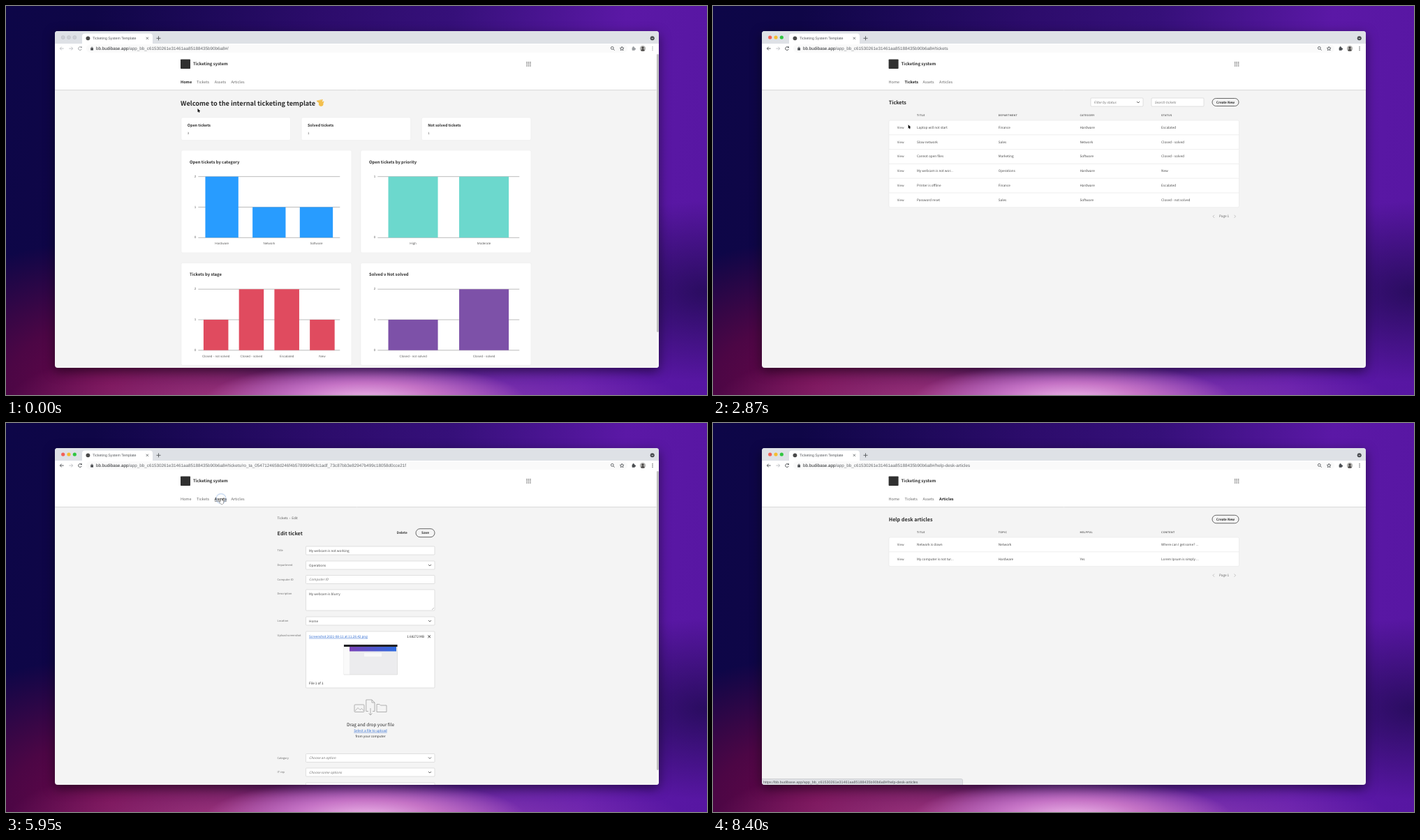
An HTML page with a canvas that plays this animation: 1004x558 px, repeating every 8470 ms.

```html
<!DOCTYPE html>
<html lang="en">
<head>
<meta charset="utf-8">
<title>Ticketing system</title>
<style>
html, body { margin: 0; width: 100%; height: 100%; overflow: hidden; }
body {
  background:
    radial-gradient(230px 55px at 515px 566px, #f0bcec, #c674c6 45%, transparent),
    radial-gradient(330px 75px at 640px 570px, #8f3cba, transparent),
    radial-gradient(330px 90px at 330px 572px, #a63a86, transparent),
    radial-gradient(330px 210px at 150px 545px, #68074a, #4c0645 45%, transparent),
    radial-gradient(240px 130px at 1004px 410px, #2a0c60, transparent),
    linear-gradient(97deg, #0d0648 0, #0f0647 12%, #2c0c6b 42%, #36107a 60%, #5b18a6 83%, #5716a2);
}
canvas { display: block; }
</style>
</head>
<body>
<canvas id="stage" width="1004" height="558"></canvas>
<script>
const ctx = document.getElementById('stage').getContext('2d');
const LOOP = 8470;
const PAGE_FONT = '"Noto Sans CJK JP", "Noto Sans CJK SC", "Noto Sans CJK", "Noto Sans", sans-serif';
const UI_FONT = '"Liberation Sans", Arial, sans-serif';
const HOST = 'bb.budibase.app';
const APP = '/app_bb_c61530261e31461aa85188435b90b6a8#/';
const TICKET = 'tickets/ro_ta_0547124658d246f4b5789994fcfc1adf_73c87bb3e82947b499c18058d0cce21f';
const DARK = '#2c2c2c', GREY = '#6a6a6a';

ctx.textRendering = 'geometricPrecision';

function write(str, x, y, size, { color = DARK, style = '', font = PAGE_FONT, align = 'left', gap = 0 } = {}) {
  ctx.font = `${style} ${size}px ${font}`;
  ctx.textAlign = align;
  ctx.letterSpacing = gap + 'px';
  ctx.fillStyle = color;
  ctx.fillText(str, x, y + size * 0.36);
  return ctx.measureText(str).width;
}
const bold = (str, x, y, size, color) => write(str, x, y, size, { style: 'bold', color });
const ui = (str, x, y, size, color, align) => write(str, x, y, size, { font: UI_FONT, color, align });

function rect(x, y, w, h, fill, r = 0, stroke, width = 0.6) {
  ctx.beginPath();
  ctx.roundRect(x, y, w, h, r);
  if (fill) { ctx.fillStyle = fill; ctx.fill(); }
  if (stroke) { ctx.strokeStyle = stroke; ctx.lineWidth = width; ctx.stroke(); }
}
function line(color, width, ...points) {
  ctx.beginPath();
  for (let i = 0; i < points.length; i += 2) ctx.lineTo(points[i], points[i + 1]);
  ctx.strokeStyle = color;
  ctx.lineWidth = width;
  ctx.stroke();
}
function arc(x, y, r, color, width, from = 0, to = 7) {
  ctx.beginPath();
  ctx.arc(x, y, r, from, to);
  ctx.strokeStyle = color;
  ctx.lineWidth = width;
  ctx.stroke();
}
function dot(x, y, r, color) {
  ctx.beginPath();
  ctx.arc(x, y, r, 0, 7);
  ctx.fillStyle = color;
  ctx.fill();
}
const chevron = (x, y) => line('#555', 0.9, x - 2, y - 1, x, y + 1, x + 2, y - 1);

// ---- page parts

function spinner(y, t) {
  const a = -0.26 + (t - 1960) / 692 * 2 * Math.PI;
  arc(502.8, y, 5.5, '#dcdce2', 0.7);
  arc(502.8, y, 5.5, '#41459a', 1, a - 1.05, a + 1.05);
}
function pill(label, x, y, w, h) {
  rect(x, y - h / 2, w, h, null, h / 2, '#444', 0.8);
  write(label, x + w / 2, y, 4.7, { style: 'bold', align: 'center' });
}
function field(str, x, y, w, { h = 12, hint = false, select = false } = {}) {
  rect(x, y - 6, w, h, '#fff', 1, '#cfcfcf');
  write(str, x + 4.5, y, 4.7, { style: hint ? 'italic' : '', color: hint ? '#707070' : '#484848' });
  if (select) chevron(x + w - 7, y);
}
function table(y, headers, rows) {
  const column = i => 292 + i * 116.7, pitch = 20.8;
  const bottom = y + 7.5 + rows.length * pitch;
  headers.forEach((h, i) => write(h, column(i), y, 3.5, { style: 'bold', color: '#555', gap: 0.4 }));
  rect(252, y + 7.5, 501.5, bottom - y - 7.5, '#fff', 2, '#e6e6e6');
  rows.forEach((row, r) => {
    const cy = y + 17.7 + r * pitch;
    if (r) line('#e8e8e8', 0.7, 252, cy - 10.2, 753.5, cy - 10.2);
    write('View', 263.7, cy, 4.5, { color: '#555' });
    row.forEach((cell, i) => write(cell, column(i), cy, 4.7, { color: '#484848' }));
  });
  write('Page 1', 725, bottom + 13, 4.7, { color: '#666' });
  for (const [x, d] of [[717, 1], [747.5, -1]])
    line('#aaa', 0.7, x + d, bottom + 11, x - d, bottom + 13, x + d, bottom + 15);
}
function chart(title, x, y, max, color, bars) {
  rect(x, y, 244, 147, '#fff', 2, '#ececec');
  bold(title, x + 12, y + 16.5, 5.9);
  const left = x + 24.3, slot = 203 / bars.length, base = y + 125.3, height = 87.6;
  for (let i = 0; i <= max; i++) {
    const ly = base - height * i / max;
    line('#b5b5b5', 0.9, left, ly, left + 203, ly);
    ui(String(i), left - 3, ly - 0.5, 4.6, '#666', 'right');
  }
  bars.forEach(([label, value], i) => {
    const h = height * value / max;
    rect(left + slot * (i + 0.15), base - h, slot * 0.7, h, color);
    ui(label, left + slot * (i + 0.5), base + 8.2, 4.6, '#666', 'center');
  });
}
function wave(x, y) {
  ctx.lineCap = 'round';
  for (let i = 0; i < 4; i++)
    line('#f3bf4c', 1.9, x + 1, y + 1, x - 4 + i * 2.2, y - 2.8 - i * 0.5);
  line('#f3bf4c', 1.9, x + 2, y + 2, x + 4.5, y - 1.5);
  ctx.lineCap = 'butt';
  dot(x + 1.2, y + 1.6, 3.3, '#f3bf4c');
}

// ---- pages

function home() {
  bold('Welcome to the internal ticketing template', 250, 139.3, 9.2);
  wave(450, 139);
  [['Open tickets', 3], ['Solved tickets', 1], ['Not solved tickets', 1]].forEach(([label, n], i) => {
    const x = 251 + i * 172.2;
    rect(x, 160, 156.5, 32.5, '#fff', 2, '#ececec');
    bold(label, x + 8.8, 171, 5.4);
    write(String(n), x + 8.8, 182, 4.3, { color: '#555' });
  });
  chart('Open tickets by category', 251, 207, 2, '#289cff', [['Hardware', 2], ['Network', 1], ['Software', 1]]);
  chart('Open tickets by priority', 508, 207, 1, '#6cd8cd', [['High', 1], ['Moderate', 1]]);
  chart('Tickets by stage', 251, 368.5, 2, '#e04b5f',
    [['Closed - not solved', 1], ['Closed - solved', 2], ['Escalated', 2], ['New', 1]]);
  chart('Solved v Not solved', 508, 368.5, 2, '#7d51a8', [['Closed - not solved', 1], ['Closed - solved', 2]]);
}

function ticketsHead(y) {
  bold('Tickets', 251.7, y, 7.2);
  field('Filter by status', 541, y, 75, { hint: true, select: true });
  field('Search tickets', 628, y, 75, { hint: true });
  pill('Create New', 715, y, 38, 11);
}
function ticketsLoading(t) {
  spinner(151, t);
  ticketsHead(197);
  spinner(229, t);
}
function tickets() {
  ticketsHead(138);
  table(156.5, ['TITLE', 'DEPARTMENT', 'CATEGORY', 'STATUS'], [
    ['Laptop will not start', 'Finance', 'Hardware', 'Escalated'],
    ['Slow network', 'Sales', 'Network', 'Closed - solved'],
    ['Cannot open files', 'Marketing', 'Software', 'Closed - solved'],
    ['My webcam is not wor...', 'Operations', 'Hardware', 'New'],
    ['Printer is offline', 'Finance', 'Hardware', 'Escalated'],
    ['Password reset', 'Sales', 'Software', 'Closed - not solved'],
  ]);
}

function editTicket() {
  const x = 429.5, w = 184.5;
  const label = (str, y) => write(str, 388.6, y, 3.9, { color: GREY });
  write('Tickets  ›  Edit', 388.6, 136, 4.6, { color: '#555' });
  bold('Edit ticket', 388.6, 158, 7.2);
  bold('Delete', 559.8, 157.3, 4.7);
  pill('Save', 587, 157.7, 27, 12);
  label('Title', 183);
  field('My webcam is not working', x, 183, w);
  label('Department', 204);
  field('Operations', x, 204, w, { select: true });
  label('Computer ID', 224.5);
  field('Computer ID', x, 224.5, w, { hint: true });
  label('Description', 245);
  field('My webcam is blurry', x, 245, w, { h: 30 });
  line('#999', 0.6, 610, 268, 613, 265);
  label('Location', 284);
  field('Home', x, 284, w, { select: true });

  label('Upload screenshot', 305);
  rect(x, 299, w, 81, '#fff', 1, '#cfcfcf');
  const link = '#2f6bd0';
  const linkWidth = write('Screenshot 2021-08-11 at 11.28.42 png', 434, 306.3, 4.7, { color: link });
  line(link, 0.5, 434, 309, 434 + linkWidth, 309);
  write('1.68272 MB', 599, 306.3, 4.7, { align: 'right' });
  line(DARK, 0.9, 604.3, 304.5, 608, 308.2);
  line(DARK, 0.9, 604.3, 308.2, 608, 304.5);
  rect(484, 318, 76.5, 43, '#ececee', 0, '#ccc', 0.5);
  rect(484, 318, 76.5, 3, '#202024');
  rect(484, 321, 8, 39.5, '#fafafa');
  const banner = ctx.createLinearGradient(492, 0, 559, 0);
  banner.addColorStop(0, '#7a42b8');
  banner.addColorStop(1, '#2d6be0');
  rect(492, 321, 67, 6.5, banner);
  rect(513, 330, 25, 5, '#f8f8f8');
  write('File 1 of 1', 434, 373, 4.7);

  const icon = '#a0a0a0';
  rect(499, 404, 14, 10.5, null, 1, icon, 0.8);
  line(icon, 0.7, 500, 413, 504, 408.5, 507, 411.5, 509.5, 409.5, 512.5, 413);
  line(icon, 0.8, 519, 413.5, 515.8, 413.5, 515.8, 397, 524, 397, 528, 401, 528, 413.5, 525, 413.5);
  line(icon, 0.8, 524, 397, 524, 401, 528, 401);
  line(icon, 0.8, 531, 414.5, 531, 403.5, 535, 403.5, 536.5, 405, 545, 405, 545, 414.5, 531, 414.5);
  line(icon, 0.8, 522, 409, 522, 419);
  line(icon, 0.8, 519.5, 416.5, 522, 419, 524.5, 416.5);
  write('Drag and drop your file', 522, 433, 6.4, { style: '500', align: 'center' });
  const pick = write('Select a file to upload', 522, 441.3, 4.75, { color: link, align: 'center' });
  line(link, 0.5, 522 - pick / 2, 444, 522 + pick / 2, 444);
  write('from your computer', 522, 449, 4.6, { align: 'center' });

  label('Category', 480.5);
  field('Choose an option', x, 480.5, w, { hint: true, select: true });
  label('IT rep', 501);
  field('Choose some options', x, 501, w, { hint: true, select: true });
  rect(x, 516, w, 12, '#fff', 1, '#cfcfcf');
}

function assets(t, loaded) {
  const headers = ['NAME', 'ASSET TYPE', 'ASSET STATE', 'LOCATION'];
  const laptop = ['13in Velnote', 'Laptop', 'In stock', 'Belfast'];
  bold('Assets', 251.7, 138.3, 7.2);
  pill('Create New', 715, 138, 38, 11.5);
  if (loaded > 1) table(156.5, headers, [laptop, ['24in Monitor', 'Monitor', 'In use', 'Belfast']]);
  else spinner(169, t);
  const y = loaded > 1 ? 247 : 199;
  bold('In stock', 251.7, y, 7.2);
  if (loaded) table(y + 11.3, headers, [laptop]);
  else spinner(y + 30, t);
}

function articles(t, loaded) {
  bold('Help desk articles', 251.7, 138.3, 7.2);
  pill('Create New', 715, 138, 38, 11.5);
  if (!loaded) return spinner(169, t);
  table(156.5, ['TITLE', 'TOPIC', 'HELPFUL', 'CONTENT'], [
    ['Network is down', 'Network', '', 'Where can I get some? ...'],
    ['My computer is not tur...', 'Hardware', 'Yes', 'Lorem Ipsum is simply ...'],
  ]);
}

// ---- timeline

// start, active nav item, path, scrollbar thumb, content
const scenes = [
  [0, 0, '', 399, home],
  [1830, 1, 'tickets', 0, ticketsLoading],
  [2240, 1, 'tickets', 0, tickets],
  [4060, -1, TICKET, 0, t => spinner(151, t)],
  [4410, -1, TICKET, 429, editTicket],
  [6020, 2, 'assets', 0, t => assets(t, 0)],
  [6380, 2, 'assets', 0, t => assets(t, 1)],
  [6730, 2, 'assets', 0, t => assets(t, 2)],
  [7130, 3, 'help-desk-articles', 0, t => articles(t, false)],
  [7500, 3, 'help-desk-articles', 0, t => articles(t, true)],
];
const statuses = [
  [1400, 2450, 'https://' + HOST + APP + 'tickets'],
  [6020, 6350, 'https://' + HOST + APP + 'assets'],
  [6550, 6800, 'Waiting for ' + HOST + '...'],
  [6800, LOOP, 'https://' + HOST + APP + 'help-desk-articles'],
];
const moves = [
  [0, 274.5, 147], [250, 274.5, 147], [1050, 283.8, 112], [1300, 283.8, 112], [1500, 284, 108.5],
  [2400, 284, 108.5], [3400, 274.5, 244], [5200, 274.5, 244], [5560, 308, 108.5],
  [6150, 308, 108.5], [6500, 330, 110.5], [LOOP, 330, 110.5],
];
const clicks = [1750, 3930, 5900, 7030];
const CURSOR_GONE = 7900;

function pointerAt(t) {
  const i = moves.findIndex(m => m[0] > t);
  const [t0, x0, y0] = moves[i - 1], [t1, x1, y1] = moves[i];
  const p = (t - t0) / (t1 - t0), e = p * p * (3 - 2 * p);
  return { x: x0 + (x1 - x0) * e, y: y0 + (y1 - y0) * e };
}

function drawPointer({ x, y }, hand, t) {
  for (const start of clicks) {
    const age = t - start;
    if (age < 0 || age > 500) continue;
    ctx.globalAlpha = Math.min(1, age / 150, (500 - age) / 150);
    dot(x, y, 5.5 + 5 * Math.min(1, age / 170), 'rgba(255,255,255,.35)');
    arc(x, y, 5.5 + 5 * Math.min(1, age / 170), '#6a97d8', 1.3);
    ctx.globalAlpha = 1;
  }
  const shape = hand
    ? [0, 0, 1, 0.3, 1.2, 2.4, 3.7, 3.2, 3.5, 6, 2.7, 7.4, -0.4, 7.4, -2.5, 4.4, -1.6, 3.8, -0.6, 4.6, -0.6, 0.4]
    : [0, 0, 0, 5.4, 1.2, 4.3, 2, 6.1, 2.9, 5.7, 2.1, 4, 3.8, 3.9];
  ctx.beginPath();
  for (let i = 0; i < shape.length; i += 2) ctx.lineTo(x + shape[i], y + shape[i + 1]);
  ctx.closePath();
  ctx.strokeStyle = hand ? '#222' : '#fff';
  ctx.lineWidth = 0.9;
  ctx.fillStyle = hand ? '#fff' : '#000';
  ctx.stroke();
  ctx.fill();
}

function browser(t, path) {
  const awake = t > 700, used = path !== '';
  const tool = used ? '#4a4d51' : '#9a9da1', faint = '#b9bcc0';
  rect(70, 36, 865, 18, '#dee1e6');
  ['#f25f57', '#f5bd30', '#2fc640'].forEach((c, i) => {
    dot(81.7 + i * 8.3, 45, 2.6, awake ? c : '#cdd0d5');
    if (!awake) arc(81.7 + i * 8.3, 45, 2.5, '#b8bbc0', 0.5);
  });
  rect(109, 39.5, 101, 18, '#fff', 4);
  dot(117.4, 46.3, 2.9, '#4a4a4a');
  ui('Ticketing System Template', 124, 46.3, 5.25, '#55585c');
  line('#55585c', 0.8, 200.8, 44.7, 204, 47.9);
  line('#55585c', 0.8, 200.8, 47.9, 204, 44.7);
  line('#55585c', 0.9, 215.5, 46.3, 221.5, 46.3);
  line('#55585c', 0.9, 218.5, 43.3, 218.5, 49.3);
  dot(925.7, 46.3, 3, '#45484c');
  line('#fff', 0.8, 924.4, 45.8, 925.7, 47.1, 927, 45.8);

  rect(70, 54, 865, 15, '#fff');
  rect(115, 55.3, 775, 11.4, '#fafafa', 5.5);
  for (const [x, d, color] of [[80, 1, used ? tool : faint], [93, -1, faint]]) {
    line(color, 0.9, x - 2.7, 61, x + 2.7, 61);
    line(color, 0.9, x - d * 0.3, 58.6, x - d * 2.7, 61, x - d * 0.3, 63.4);
  }
  arc(106, 61, 2.4, tool, 0.9, 0.3, 5.5);
  rect(106.9, 58.2, 1.9, 1.9, tool);
  rect(121.2, 60.3, 3.8, 3.1, '#45484c');
  arc(123.1, 60.2, 1.2, '#45484c', 0.7, Math.PI, 0);
  const hostWidth = ui(HOST, 129, 61, 6.3, '#26282b');
  ui(APP + path, 129 + hostWidth, 61, 6.3, '#64676b');

  arc(868.3, 60.3, 1.9, '#55585c', 0.9);
  line('#55585c', 0.9, 869.7, 61.7, 871.6, 63.6);
  const star = [];
  for (let i = 0; i <= 10; i++) {
    const a = i * Math.PI / 5 - Math.PI / 2, r = i % 2 ? 1.4 : 3;
    star.push(882.2 + r * Math.cos(a), 61.2 + r * Math.sin(a));
  }
  line('#45484c', 0.8, ...star);
  rect(896.6, 59.5, 4.2, 4.2, tool, 0.6);
  dot(898.6, 59.2, 1.1, tool);
  dot(901, 61.6, 1.1, tool);
  dot(912, 61, 4.2, '#b9b9b7');
  dot(912, 60, 1.7, '#494645');
  rect(909.4, 62, 5.2, 2.6, '#494645', [2, 2, 1, 1]);
  for (const y of [58.8, 61, 63.2]) dot(926, y, 0.7, tool);
}

function header(left, active, hovered) {
  rect(70, 69, 865, 51.3, '#fff');
  line('#dadada', 1, 70, 120.6, 935, 120.6);
  rect(left, 76.5, 14, 13.5, '#303030', 0.8);
  bold('Ticketing system', left + 18, 83.3, 6);
  for (let i = 0; i < 9; i++)
    rect(left + 495.3 + i % 3 * 2.5, 80 + Math.floor(i / 3) * 2.5, 1.4, 1.4, '#777');
  navItems.forEach(([label, offset], i) => {
    const strong = i === active || i === hovered;
    const w = write(label, left + offset, 108.7, 5.5, { style: strong ? 'bold' : '500', color: strong ? '#222' : GREY });
    if (i === hovered) line('#222', 0.6, left + offset, 112.2, left + offset + w, 112.2);
  });
}
const navItems = [['Home', 0, 15.5], ['Tickets', 23, 42], ['Assets', 48.8, 65.5], ['Articles', 72.5, 92]];

function draw(t) {
  const [, active, path, thumb, content] = scenes.findLast(s => s[0] <= t);
  const left = thumb ? 250 : 251.6;
  const pointer = pointerAt(t), visible = t < CURSOR_GONE;
  const hovered = visible && pointer.y < 111.5
    ? navItems.findIndex(([, from, to]) => pointer.x >= left + from && pointer.x <= left + to) : -1;

  ctx.clearRect(0, 0, 1004, 558);
  ctx.save();
  ctx.shadowColor = 'rgba(0,0,0,.5)';
  ctx.shadowBlur = 16;
  ctx.shadowOffsetY = 5;
  rect(70, 36, 865, 483, '#f4f4f4', 4);
  ctx.restore();

  ctx.save();
  ctx.beginPath();
  ctx.roundRect(70, 36, 865, 483, 4);
  ctx.clip();
  browser(t, path);
  header(left, active, hovered);
  content(t);
  if (thumb) {
    rect(931.5, 69, 3.5, 450, '#f7f7f7');
    rect(932, 69, 2.8, thumb, '#bdbdbd', 1.4);
  }
  const status = statuses.find(([from, to]) => t >= from && t < to);
  if (status) {
    rect(69, 510.5, 288.5, 10, '#dfe1e5', [0, 2, 0, 0], '#bfc1c5');
    ui(status[2], 72, 514.8, 5.42, '#55585c');
  }
  ctx.restore();
  if (visible) drawPointer(pointer, hovered >= 0, t);
}

function frame() {
  draw(performance.now() % LOOP);
  requestAnimationFrame(frame);
}
frame();
</script>
</body>
</html>
```
